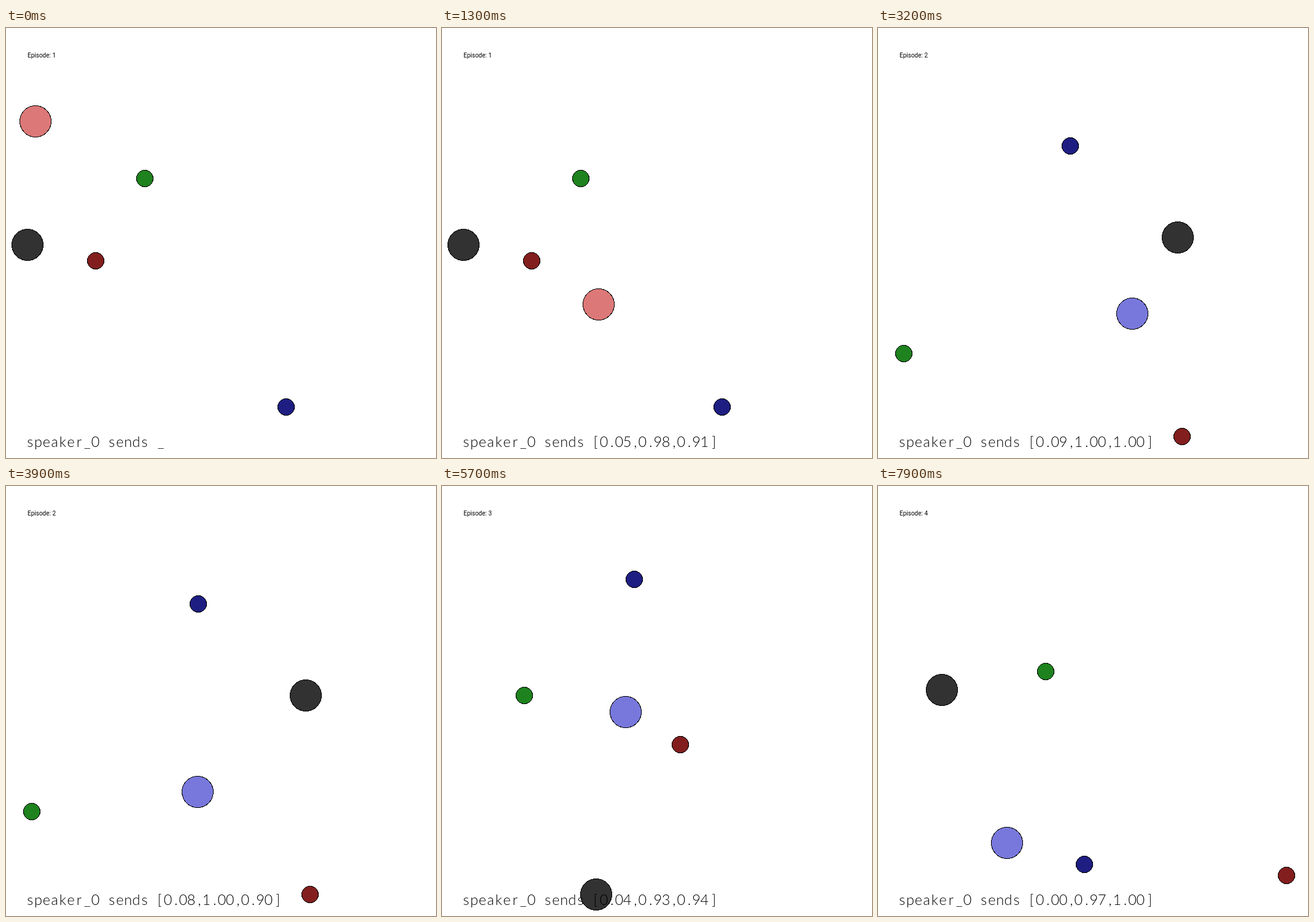
Write an HTML page that moves like this. It is 700x700 px and loops after 8 s.

```html
<!DOCTYPE html>
<html lang="en">
<head>
<meta charset="utf-8">
<title>Speaker and listener</title>
<style>
  html, body { margin: 0; width: 100%; height: 100%; overflow: hidden; background: #fff; }
  svg { display: block; width: 100vw; height: 100vh; }
  circle { stroke: #000; stroke-width: 1; shape-rendering: crispEdges; }
  #episode { font: 10px Roboto, sans-serif; }
  #message { font: 300 23.5px Lato, sans-serif; text-anchor: middle; }
</style>
</head>
<body>
<svg viewBox="0 0 700 700">
  <g id="scene"></g>
  <text id="episode" x="35" y="48"></text>
  <text id="message" y="682"></text>
</svg>
<script>
const STEP = 100, EPISODE_STEPS = 25, LOOP = 8000;
const CENTER = 350, REACH = 315;
const PINK = "#dc7878", LILAC = "#7878dc";

// Fixed bodies, and the listener's route: start, end, overshoot and the step where that peaks.
const episodes = [
  { tint: PINK,
    bodies: { speaker: [35, 353], red: [146, 379], green: [226, 245], blue: [456, 617] },
    route: { start: [48, 152], end: [250, 418], overshoot: [7, 39], peak: 11 } },
  { tint: LILAC,
    bodies: { speaker: [488, 341], red: [495, 665], green: [42, 530], blue: [313, 192] },
    route: { start: [831, 338], end: [304, 466], overshoot: [11, 47], peak: 11 } },
  { tint: LILAC,
    bodies: { speaker: [251, 665], red: [388, 421], green: [134, 341], blue: [313, 152] },
    route: { start: [179, 571], end: [290, 300], overshoot: [33, 15], peak: 8 } },
  { tint: LILAC,
    bodies: { speaker: [104, 332], red: [665, 634], green: [273, 302], blue: [336, 616] },
    route: { start: [101, 600], end: [368, 556], overshoot: [0, 0], peak: 11 } }
];

const byId = id => document.getElementById(id);
const bell = x => Math.exp(-x * x);

function addCircle(radius, fill) {
  const circle = document.createElementNS("http://www.w3.org/2000/svg", "circle");
  circle.setAttribute("r", radius - 0.5);
  circle.setAttribute("fill", fill);
  return byId("scene").appendChild(circle);
}

const circles = {
  speaker: addCircle(26, "#323232"),
  listener: addCircle(26, PINK),
  red: addCircle(14, "#821e1e"),
  green: addCircle(14, "#1e821e"),
  blue: addCircle(14, "#1e1e82")
};

// Speeds up from rest, swings past the end point and settles there.
function listenerAt({ start, end, overshoot, peak }, step) {
  const remaining = bell(step / 5.5), swing = bell((step - peak) / 5);
  return end.map((goal, axis) =>
    goal + (start[axis] - goal) * remaining + overshoot[axis] * swing);
}

function noise(seed) {
  const s = Math.sin(seed * 12.9898) * 43758.5453;
  return s - Math.floor(s);
}

// The speaker is silent at first, then repeats (0, 1, 1) with clipped noise.
function messageAt(tick) {
  if (tick % EPISODE_STEPS === 0) return "_";
  const values = [0, 1, 1].map((base, k) => {
    const drift = Math.max(0, noise(tick * 3 + k) * 0.2 - 0.1);
    return Math.abs(base - drift).toFixed(2);
  });
  return `[${values.join(",")}]`;
}

// Centres each glyph in its cell; punctuation has narrower cells.
function writeMessage(text) {
  const lean = { "[": -2, "]": 2 };
  let left = 34;
  const xs = [...text].map(char => {
    const x = left + 5.2 + (lean[char] || 0);
    left += "[.,".includes(char) ? 11.5 : 13.3;
    return x.toFixed(1);
  });
  byId("message").setAttribute("x", xs.join(" "));
  byId("message").textContent = text;
}

function render(tick) {
  const index = Math.floor(tick / EPISODE_STEPS);
  const { tint, bodies, route } = episodes[index];
  const places = { ...bodies, listener: listenerAt(route, tick % EPISODE_STEPS) };

  // The camera zooms so that the farthest body stays in view.
  const farthest = Math.max(...Object.values(places).flat().map(v => Math.abs(v - CENTER)));
  const project = v => Math.floor(CENTER + (v - CENTER) * REACH / farthest + 0.05);
  for (const [name, [x, y]] of Object.entries(places)) {
    circles[name].setAttribute("cx", project(x));
    circles[name].setAttribute("cy", project(y));
  }
  circles.listener.setAttribute("fill", tint);
  byId("episode").textContent = `Episode: ${index + 1}`;
  writeMessage(`speaker_0 sends ${messageAt(tick)}`);
}

const start = performance.now();
let shown = -1;
function frame() {
  const tick = Math.floor((performance.now() - start) % LOOP / STEP);
  if (tick !== shown) render(shown = tick);
  requestAnimationFrame(frame);
}
frame();
</script>
</body>
</html>
```
